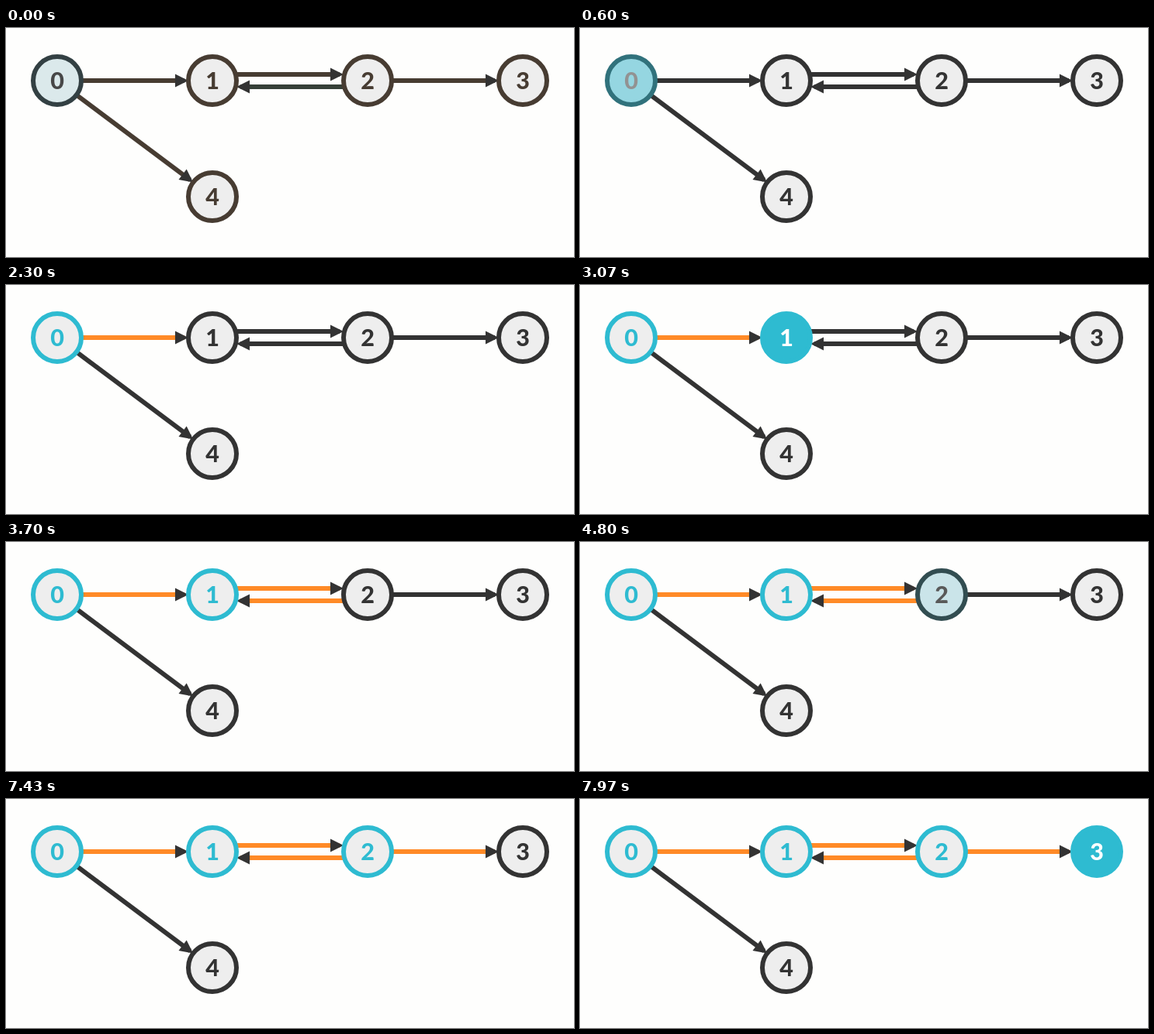
Recreate the animation shown at these times as an HTML page. Size 732 by 296 pixels, loop 8 s.

```html
<!DOCTYPE html>
<html lang="en">
<head>
<meta charset="utf-8">
<title>Depth-first search</title>
<style>
  html, body { margin: 0; width: 100%; height: 100%; overflow: hidden; background: #fefefd; }
  svg { display: block; width: 732px; height: 296px; }
  text { font: 800 30.5px Lato, "Open Sans", sans-serif; text-anchor: middle; }
</style>
</head>
<body>
<svg id="stage" viewBox="0 0 732 296"></svg>
<script>
const LOOP = 8000, FIRST = 357, STEP = 710.6, FADE = 500;
const DARK = [51, 51, 51], PALE = [238, 238, 238], TEAL = [46, 187, 209];
const ORANGE = [255, 138, 39], WHITE = [255, 255, 255], GREEN = [82, 188, 105];

// Node looks: fill, ring, digit
const PLAIN = [PALE, DARK, DARK];
const ACTIVE = [TEAL, TEAL, WHITE];
const DONE = [PALE, TEAL, TEAL];
const SEEN = [PALE, ORANGE, ORANGE];

// Changes are [step, look]; step -1 clears the earlier run
const nodes = [
  { x: 66, y: 68, from: ACTIVE, changes: [[-1, PLAIN], [0, ACTIVE], [1, DONE]] },
  { x: 266, y: 68, from: SEEN, changes: [[-1, PLAIN], [3, ACTIVE], [4, DONE]] },
  { x: 466, y: 68, from: SEEN, changes: [[-1, PLAIN], [6, ACTIVE], [7, DONE]] },
  { x: 666, y: 68, from: SEEN, changes: [[-1, PLAIN], [10, ACTIVE]] },
  { x: 266, y: 218, from: SEEN, changes: [[-1, PLAIN]] }
];

// grow: step of the thick sweep; fade: step of a plain recolouring
const edges = [
  { a: 0, b: 1, grow: 1 },
  { a: 1, b: 2, shift: -8, grow: 4 },
  { a: 2, b: 1, shift: 8, grow: 7, fade: 4, from: GREEN },
  { a: 2, b: 3, grow: 8 },
  { a: 0, b: 4 }
];

const stage = document.getElementById("stage");

function add(tag, attrs) {
  const el = document.createElementNS("http://www.w3.org/2000/svg", tag);
  for (const key in attrs) el.setAttribute(key, attrs[key]);
  return stage.appendChild(el);
}

const mix = (a, b, p) => a.map((v, i) => v + (b[i] - v) * p);
const rgb = c => `rgb(${c.map(Math.round).join(",")})`;

// Cubic ease in and out, followed by a rest until the next step
function progress(t, step) {
  const u = Math.min(1, Math.max(0, (t - FIRST - step * STEP) / FADE));
  return u < 0.5 ? 4 * u ** 3 : 1 - 4 * (1 - u) ** 3;
}

for (const e of edges) {
  const a = nodes[e.a], b = nodes[e.b], shift = e.shift || 0;
  const len = Math.hypot(b.x - a.x, b.y - a.y);
  const dx = (b.x - a.x) / len, dy = (b.y - a.y) / len;
  const at = d => [a.x + dx * d, a.y + dy * d + shift];
  e.start = at(32);
  e.end = at(len - 32);
  const [x1, y1] = e.start, [x2, y2] = at(len - 36), [tx, ty] = at(len - 31);
  e.line = add("line", { x1, y1, x2, y2, "stroke-width": 6 });
  e.sweep = add("line", { x1, y1, x2: x1, y2: y1, "stroke-width": 10, stroke: rgb(ORANGE) });
  add("path", {
    d: "M0 0L-17 -8.5V8.5Z",
    fill: rgb(DARK),
    transform: `translate(${tx} ${ty}) rotate(${Math.atan2(dy, dx) * 180 / Math.PI})`
  });
}

nodes.forEach((n, i) => {
  n.disc = add("circle", { cx: n.x, cy: n.y, r: 31, "stroke-width": 6 });
  n.label = add("text", { x: n.x, y: n.y + 11 });
  n.label.textContent = i;
});

function drawEdge(e, t) {
  const base = mix(e.from || ORANGE, DARK, progress(t, -1));
  const p = e.grow === undefined ? 0 : progress(t, e.grow);
  let color = p === 1 ? ORANGE : base;
  if (e.fade !== undefined) color = mix(base, ORANGE, progress(t, e.fade));
  e.line.setAttribute("stroke", rgb(color));
  const [x, y] = mix(e.start, e.end, p);
  e.sweep.setAttribute("x2", x);
  e.sweep.setAttribute("y2", y);
  e.sweep.setAttribute("visibility", p > 0 && p < 1 ? "visible" : "hidden");
}

function drawNode(n, t) {
  let look = n.from;
  for (const [step, next] of n.changes) {
    const p = progress(t, step);
    look = look.map((c, i) => mix(c, next[i], p));
  }
  n.disc.setAttribute("fill", rgb(look[0]));
  n.disc.setAttribute("stroke", rgb(look[1]));
  n.label.setAttribute("fill", rgb(look[2]));
}

function draw(t) {
  for (const e of edges) drawEdge(e, t);
  for (const n of nodes) drawNode(n, t);
}

const began = performance.now();
function tick() {
  draw((performance.now() - began) % LOOP);
  requestAnimationFrame(tick);
}
tick();
</script>
</body>
</html>
```
